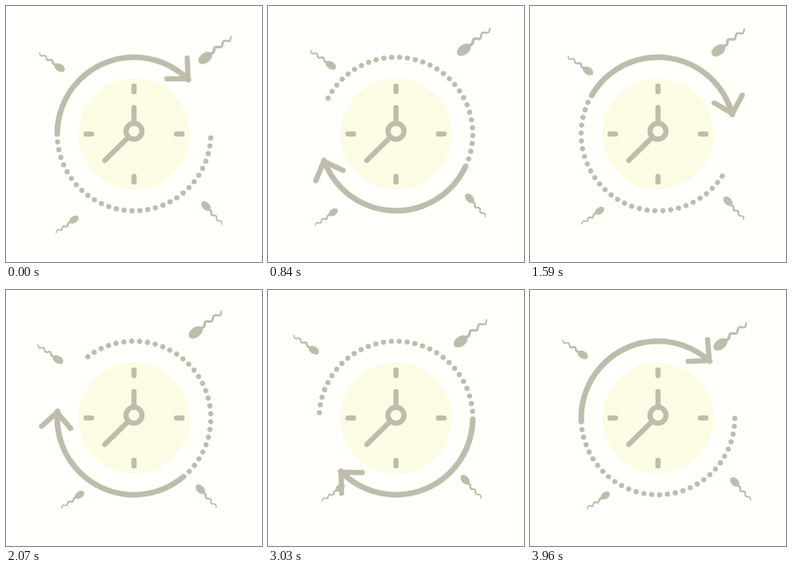
Recreate the animation shown at these times as an HTML page with a canvas. Size 320 by 320 pixels, loop 3990 ms.

```html
<!DOCTYPE html>
<html lang="en">
<head>
<meta charset="utf-8">
<title>Clock</title>
<style>
html, body { margin: 0; width: 100%; height: 100%; overflow: hidden; background: #fffffc; }
canvas { display: block; width: 100vw; height: 100vh; }
</style>
</head>
<body>
<canvas id="stage" width="320" height="320"></canvas>
<script>
const ctx = document.getElementById('stage').getContext('2d');
const LOOP = 3990, STEP = 30, TAU = Math.PI * 2;
const PAPER = '#fffffc', FACE = '#fcfce5', INK = '#bebdac';
const rad = deg => deg * Math.PI / 180;

// Arrow: three turns at three speeds
const spinTimes = [0, 1575, 2640, LOOP];
const spinAngles = [0, 384, 827, 1083];

// Swimmers drift in straight strokes between shared beats
const beats = [0, 540, 1110, 2070, 3000, 3960];
const swimmers = [
  { angle: -36, size: 1, flip: 1,
    x: [249, 257, 234, 237, 241, 238], y: [65, 51, 58, 53, 64, 68] },
  { angle: 213, size: 0.74, flip: -1,
    x: [67, 77, 80, 65, 57, 66], y: [77, 73, 75, 87, 75, 81] },
  { angle: 147, size: 0.66, flip: 1,
    x: [85, 81, 82, 92, 90, 94], y: [267, 260, 256, 256, 247, 257] },
  { angle: 46, size: 0.72, flip: -1,
    x: [250, 252, 252, 243, 246, 256], y: [250, 242, 239, 249, 237, 240] }
];

function sample(times, values, t) {
  let i = 0;
  while (i < times.length - 2 && t > times[i + 1]) i++;
  const k = (t - times[i]) / (times[i + 1] - times[i]);
  return values[i] + (values[i + 1] - values[i]) * k;
}

function disc(x, y, r, color) {
  ctx.fillStyle = color;
  ctx.beginPath();
  ctx.arc(x, y, r, 0, TAU);
  ctx.fill();
}

function line(width, ...pts) {
  ctx.lineWidth = width;
  ctx.beginPath();
  pts.forEach(([x, y]) => ctx.lineTo(x, y));
  ctx.stroke();
}

function drawClock() {
  disc(160, 160, 69.5, FACE);
  for (let i = 0; i < 4; i++) {
    ctx.save();
    ctx.translate(160, 160);
    ctx.rotate(i * TAU / 4);
    line(6.5, [0, -60], [0, -53]);
    ctx.restore();
  }
  line(6.5, [160, 127], [160, 147]);
  line(6.5, [123.5, 193], [152, 165]);
  ctx.beginPath();
  ctx.arc(160, 156.5, 10, 0, TAU);
  ctx.stroke();
}

function drawArrow(deg) {
  ctx.save();
  ctx.translate(160, 160);
  ctx.rotate(rad(deg));
  ctx.lineWidth = 7;
  ctx.beginPath();
  ctx.arc(0, 0, 96, Math.PI, rad(315));
  ctx.stroke();
  line(6.5, [66.5, -95], [67.5, -69], [41, -69]);
  for (let i = 0; i < 30; i++) {
    const a = rad(3 + i * 5.9);
    disc(96 * Math.cos(a), 96 * Math.sin(a), 3.2, INK);
  }
  ctx.restore();
}

function drawSwimmer({ angle, size, flip, x, y }, t) {
  ctx.save();
  ctx.translate(sample(beats, x, t), sample(beats, y, t));
  ctx.rotate(rad(angle));
  ctx.scale(size, size * flip);
  ctx.fillStyle = INK;
  ctx.beginPath();
  ctx.ellipse(0, 0, 9.8, 6.3, 0, 0, TAU);
  ctx.fill();
  // Tapering wavy tail
  let prev = [8, 0];
  for (let px = 9; px <= 42; px++) {
    const grow = Math.min(1, (px - 8) / 8);
    const next = [px, -grow * (1.5 + 2 * Math.cos((px - 18) * TAU / 13))];
    line(3.4 - (px - 8) * 0.045, prev, next);
    prev = next;
  }
  ctx.restore();
}

function draw(now) {
  const t = Math.floor((now % LOOP) / STEP) * STEP;
  ctx.fillStyle = PAPER;
  ctx.fillRect(0, 0, 320, 320);
  ctx.strokeStyle = INK;
  ctx.lineCap = ctx.lineJoin = 'round';
  drawClock();
  drawArrow(sample(spinTimes, spinAngles, t));
  swimmers.forEach(s => drawSwimmer(s, t));
}

const start = performance.now();
function tick() {
  draw(performance.now() - start);
  requestAnimationFrame(tick);
}
tick();
</script>
</body>
</html>
```
